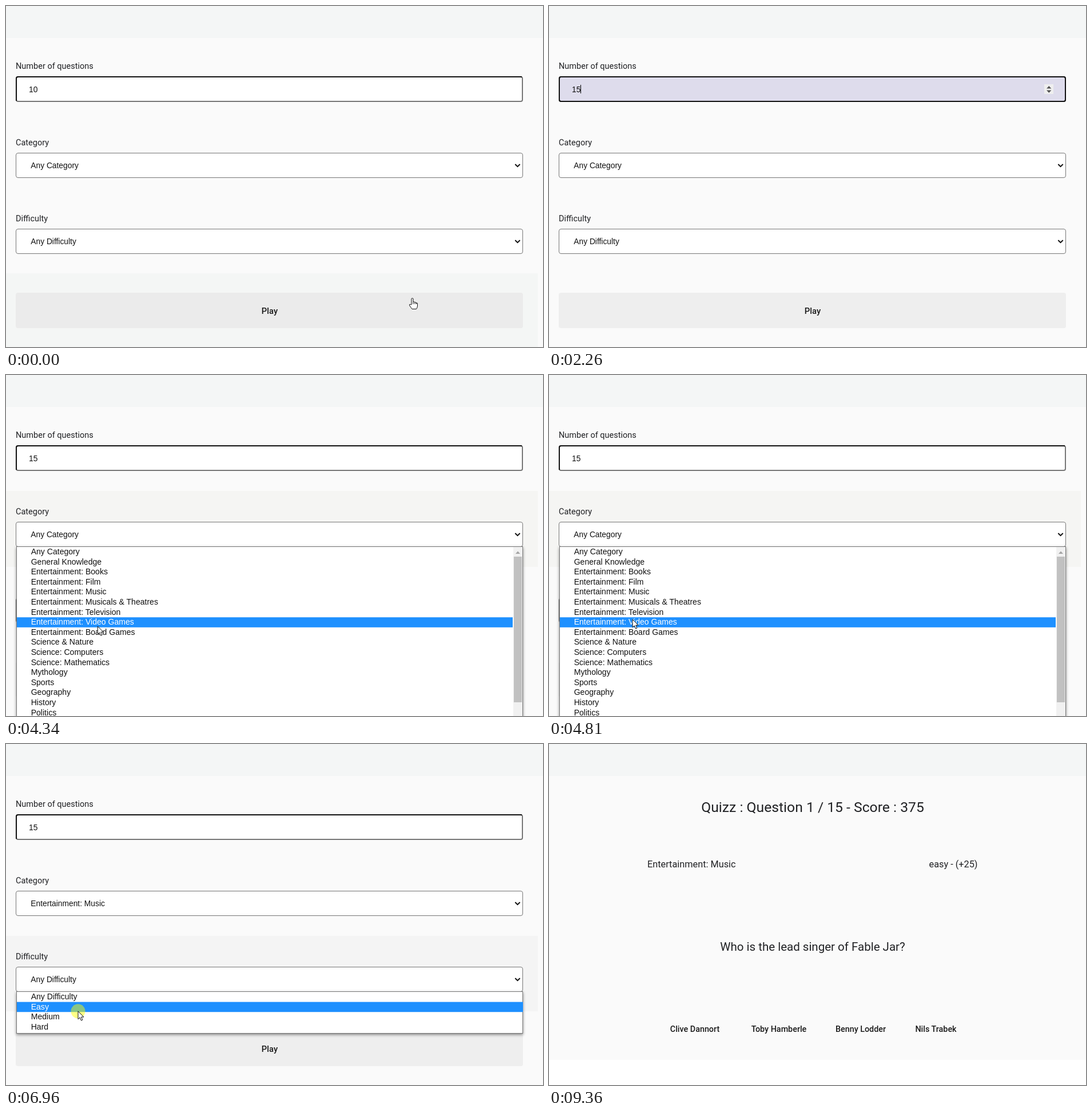
Write an HTML page that moves like this. It is 939 by 597 pixels and loops after 9.99 s.

```html
<!DOCTYPE html>
<html lang="en">
<head>
<meta charset="utf-8">
<title>Quiz setup</title>
<style>
  html, body { margin: 0; width: 100%; height: 100%; overflow: hidden; background: #fafafa; }
  svg { display: block; width: 100vw; height: 100vh; }
  text { font-family: Roboto, sans-serif; fill: #202124; white-space: pre; }
  .label { font-size: 14.5px; }
  .field { font: 13.8px "Liberation Sans", Arial, sans-serif; fill: #111; }
  .option { font: 14.05px "Liberation Sans", Arial, sans-serif; fill: #111; }
  .medium { font-weight: 500; font-size: 14.35px; fill: #1a1a1a; }
  .box { fill: #fff; stroke: #767676; }
  .ring { fill: none; stroke: #101010; stroke-width: 2; }
  .popup { filter: drop-shadow(0 2px 2.5px rgba(0, 0, 0, .45)); }
  .mid { text-anchor: middle; }
  .end { text-anchor: end; }
</style>
</head>
<body>
<svg viewBox="0 0 939 597" preserveAspectRatio="none">
  <rect width="939" height="597" fill="#fafafa"/>
  <rect width="939" height="56" fill="#f4f6f6"/>

  <g id="form">
    <rect id="shade" width="930"/>

    <text class="label" x="17" y="109.5">Number of questions</text>
    <rect id="number" class="box" x="18" y="124" width="885" height="43" rx="3" stroke-width="2"/>
    <path id="inset" d="M18 166V127Q18 124 21 124H902" class="ring"/>
    <rect id="selection" y="137" height="17" fill="#3390ff"/>
    <text id="count" class="field" x="40" y="150.5"></text>
    <path id="caret" d="M55.5 138V153" stroke="#000"/>
    <g id="focus">
      <rect class="ring" x="18" y="124" width="885" height="43" rx="3"/>
      <rect x="866" y="137" width="16" height="17" fill="#efefef"/>
      <path d="M870 144.5l4.2-4.5 4.2 4.5zM870 147.5l4.2 4.5 4.2-4.5z" fill="#505050"/>
    </g>

    <text class="label" x="17" y="244">Category</text>
    <g id="category"></g>
    <text class="label" x="17" y="376.7">Difficulty</text>
    <g id="difficulty"></g>

    <rect id="play" x="17" y="502" width="887" height="62" rx="4"/>
    <text class="medium mid" x="461" y="538.5" style="font-size:14.8px">Play</text>

    <g id="categoryPopup" class="popup"></g>
    <g id="difficultyPopup" class="popup"></g>
  </g>

  <g id="quiz">
    <rect y="553" width="939" height="44" fill="#fff"/>
    <g id="question">
      <text class="mid" x="461" y="119" font-size="24.7">Quizz : Question 1 / 15 - Score : 375</text>
      <text x="172" y="215.5" font-size="16.3">Entertainment: Music</text>
      <text class="end" x="749.5" y="215.5" font-size="16.3">easy - (+25)</text>
      <text class="mid" x="461" y="361.5" font-size="20.5">Who is the lead singer of Fable Jar?</text>
      <text class="medium mid" x="255" y="503.7">Clive Dannort</text>
      <text class="medium mid" x="402" y="503.7">Toby Hamberle</text>
      <text class="medium mid" x="545" y="503.7">Benny Lodder</text>
      <text class="medium mid" x="676.5" y="503.7">Nils Trabek</text>
    </g>
  </g>

  <g id="cursor">
    <circle id="press" r="12.5" fill="#ff0" fill-opacity=".48"/>
    <path id="arrow" d="M0 0V14L3.2 11 5.5 16.3 7.9 15.2 5.6 10.2H10Z" fill="#fff" stroke="#111"/>
    <g id="hand" fill="#fff" stroke="#111">
      <path d="M-2 12V2Q-2 .5-.5 .5T1 2V7Q3 6 4 8 6 7 7 9 8.5 8.5 8.5 10V14Q8.5 17 6.5 19.5H-1Q-3 17-5.5 13-6 10.5-3.5 11.5Z"/>
      <path d="M1 7V11M4 8V11M6.5 9V11" fill="none"/>
    </g>
    <path id="beam" d="M-3-8H3M0-8V8M-3 8H3" stroke="#111" fill="none"/>
  </g>
</svg>

<script>
const LOOP = 9990, ROW = 17.6, LAVENDER = '#dedcec';
const el = id => document.getElementById(id);
const show = (id, on) => { el(id).style.display = on ? '' : 'none'; };
const set = (id, attrs) => {
  for (const name in attrs) el(id).setAttribute(name, attrs[name]);
};
const within = (t, spans) => spans.some(([from, to]) => t >= from && t < to);

const categories = ['Any Category', 'General Knowledge',
  ...['Books', 'Film', 'Music', 'Musicals & Theatres', 'Television', 'Video Games', 'Board Games']
    .map(name => 'Entertainment: ' + name),
  'Science & Nature', 'Science: Computers', 'Science: Mathematics', 'Mythology',
  'Sports', 'Geography', 'History', 'Politics'];
const difficulties = ['Any Difficulty', 'Easy', 'Medium', 'Hard'];

const sections = [
  { top: 56, bottom: 203, color: '#f5f5f4' },
  { top: 203, bottom: 336, color: '#f5f5f3' },
  { top: 336, bottom: 468, color: '#f4f4f4' },
  { top: 468, bottom: 597, color: '#f4f6f5' }
];

const selects = [
  { id: 'category', top: 257, first: 301, right: 886, options: categories, choice: 4,
    open: [3490, 5650], focusEnd: 5960, section: 1 },
  { id: 'difficulty', top: 390, first: 434, right: 904, options: difficulties, choice: 1,
    open: [6080, 7040], focusEnd: 8360, section: 2 }
];

// Cursor path: time, x, y
const path = [
  [70, 711, 511], [400, 560, 330], [650, 120, 146], [750, 62, 146], [1040, 30, 146],
  [2640, 14, 152], [2820, 225, 280], [2870, 319, 320], [3020, 317, 318], [3180, 300, 299],
  [3330, 289, 284], [3730, 288, 284], [3950, 227, 315], [4200, 170, 400], [4490, 150, 482],
  [4660, 150, 482], [4810, 146, 428], [5120, 166, 384], [5820, 166, 384], [5960, 150, 413],
  [6420, 150, 413], [6730, 126, 467.8], [7270, 126, 467.8], [7880, 365, 538],
  [8510, 365, 538], [8830, 825, 600]
];
const away = [[1040, 2640], [8830, LOOP]];
const presses = [[680, 980], [3330, 3490], [5500, 5650], [5960, 6080], [6880, 7040], [8280, 8360]];

function cursorAt(t) {
  const next = path.findIndex(point => point[0] > t);
  if (next === 0) return path[0].slice(1);
  if (next < 0) return path[path.length - 1].slice(1);
  const [t0, x0, y0] = path[next - 1], [t1, x1, y1] = path[next];
  const k = (t - t0) / (t1 - t0);
  return [x0 + (x1 - x0) * k, y0 + (y1 - y0) * k];
}

function buildSelect({ id, top, first, right, options }) {
  const middle = top + 22;
  el(id).innerHTML = `
    <rect id="${id}Box" class="box" x="17.5" y="${top + .5}" width="886" height="43" rx="3.5"/>
    <rect id="${id}Ring" class="ring" x="18" y="${top + 1}" width="885" height="42" rx="3"/>
    <text id="${id}Value" class="field" x="43.3" y="${middle + 5}"></text>
    <path d="M890.3 ${middle - 2}l4.2 4.2 4.2-4.2" fill="none" stroke="#111" stroke-width="2"/>`;

  const scrolls = right < 904;
  const height = scrolls ? 360 : 73;
  const bar = `
    <rect x="887" y="${first}" width="16" height="340" fill="#f1f1f1"/>
    <path d="M891 313l4-4.5 4 4.5z" fill="#a3a3a3"/>
    <rect x="888" y="318" width="14" height="255" fill="#c1c1c1"/>`;
  const rows = options.map((name, i) =>
    `<text class="option" x="43.7" y="${first + 12.9 + i * ROW}">${name.replace('&', '&amp;')}</text>`);
  el(id + 'Popup').innerHTML = `
    <rect class="box" x="18.5" y="${first - .5}" width="885" height="${height}"/>
    <rect id="${id}Row" x="19" width="${right - 19}" height="${ROW}" fill="#1e90ff"/>
    ${scrolls ? bar : ''}${rows.join('')}`;
}

function drawSelect(s, t, x, y, visible) {
  const open = within(t, [s.open]);
  const over = visible && !open && x > 17 && x < 904 && y >= s.top && y < s.top + 44;
  el(s.id + 'Value').textContent = s.options[t < s.open[1] ? 0 : s.choice];
  set(s.id + 'Box', { style: `fill:${over ? LAVENDER : '#fff'}` });
  show(s.id + 'Ring', within(t, [[s.open[1], s.focusEnd]]));
  show(s.id + 'Popup', open);
  if (!open) return;
  const row = Math.max(0, Math.floor((y - s.first) / ROW));
  set(s.id + 'Row', { y: s.first + row * ROW });
  el(s.id + 'Popup').querySelectorAll('text').forEach((line, i) => {
    line.style.fill = i === row ? '#fff' : '';
  });
}

function drawNumber(t, x) {
  const focused = t >= 700 && t < 3330;
  const selecting = t >= 740 && t < 2260;
  const start = t < 1040 ? Math.max(40, Math.min(55.5, x)) : 40;
  set('number', { style: `fill:${focused ? LAVENDER : '#fff'}` });
  show('focus', focused);
  show('inset', !focused);
  show('selection', selecting);
  set('selection', { x: start, width: 55.5 - start });
  el('count').textContent = t < 2260 ? '10' : '15';
  el('count').style.fill = selecting && start < 44 ? '#fff' : '';
  show('caret', t >= 2260 && focused && Math.floor((t - 2260) / 500) % 2 === 0);
}

function drawCursor(t, x, y, visible) {
  const hand = t < 8510 && y >= 502 && y < 564;
  const beam = t < 3330 && x > 17 && y > 123 && y < 168;
  show('cursor', visible);
  set('cursor', { transform: `translate(${x} ${y})` });
  show('press', within(t, presses));
  show('hand', hand);
  show('beam', beam);
  show('arrow', !hand && !beam);
}

function draw(t) {
  const [x, y] = cursorAt(t);
  const visible = !within(t, away);
  const opened = selects.find(s => within(t, [s.open]));
  const hovered = opened ? sections[opened.section]
    : visible && sections.find(s => y >= s.top && y < s.bottom);

  show('form', t < 8360);
  show('quiz', t >= 8360);
  show('question', t >= 9360);
  show('shade', hovered);
  if (hovered) set('shade', { y: hovered.top, height: hovered.bottom - hovered.top, fill: hovered.color });
  set('play', { fill: hovered === sections[3] ? '#ebebeb' : '#eee' });

  drawNumber(t, x);
  selects.forEach(s => drawSelect(s, t, x, y, visible));
  drawCursor(t, x, y, visible);
}

selects.forEach(buildSelect);
const began = performance.now();
function tick() {
  draw((performance.now() - began) % LOOP);
  requestAnimationFrame(tick);
}
tick();
</script>
</body>
</html>
```
